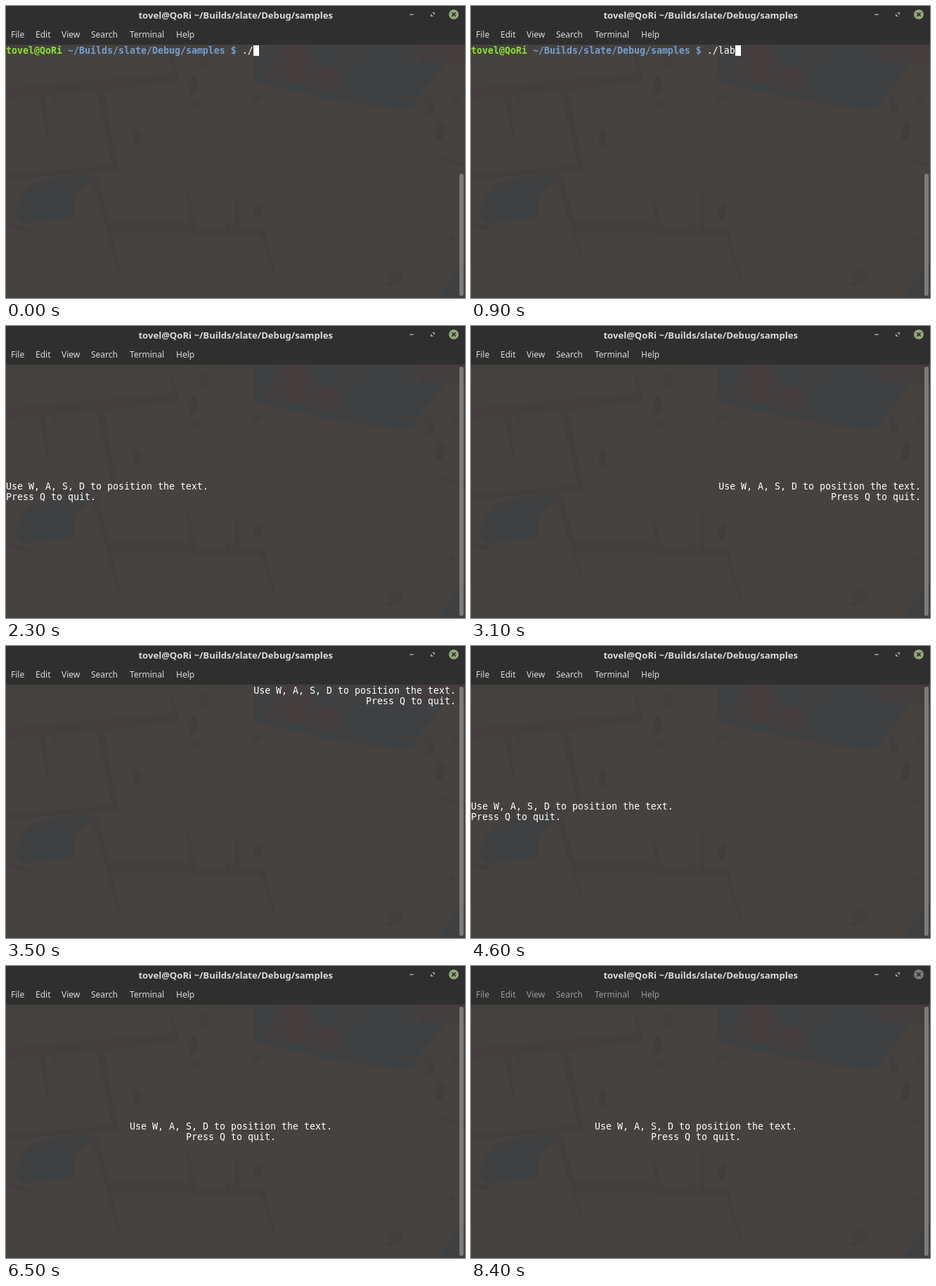
An HTML page for the animation above (8600 ms loop, 653 by 416 pixels).

```html
<!DOCTYPE html>
<html lang="en">
<head>
<meta charset="utf-8">
<title>Terminal</title>
<style>
  html, body { margin: 0; width: 100%; height: 100%; overflow: hidden; background: #2f2f2f; }
  #stage { position: relative; width: 653px; height: 416px; overflow: hidden; }
  #stage > *, #menu span { position: absolute; white-space: pre; }

  #title { right: 188px; top: 4px; font: bold 13.1px/18px "Noto Sans", sans-serif; color: #dadada; }
  #menu { left: 0; top: 32px; font: 12px/17px "Noto Sans", sans-serif; color: #dadada; }
  #close { fill: #92a878; }
  .unfocused #menu { color: #9a9a9a; }
  .unfocused #close { fill: #7b7b7b; }

  svg { left: 0; top: 0; }
  .gap { fill: #443e3e; }
  .hole { fill: #3f4042; }

  .term { left: 0; width: 640px; font: 13.29px/15px "DejaVu Sans Mono", monospace; color: #fff; }
  #shell { top: 56px; }
  #shell b:first-child { color: #8ae234; }
  #shell b { color: #729fcf; }
  #cursor { width: 8px; height: 15px; background: #fff; }
  #bar { left: 645px; width: 6px; bottom: 3px; border-radius: 3px; background: #7d7b79; }
</style>
</head>
<body>
<div id="stage">
  <svg width="653" height="416">
    <rect y="55" width="653" height="361" fill="#46423f"/>
    <g class="gap">
      <path d="M0 117L237 96 231 66 238 70 245 107 139 120 160 234 0 247V239L152 227 128 122 70 126V145L63 127 57 128 61 195 47 129 0 130Z"/>
      <path d="M122 246L130 242 147 308H258L268 317H366L390 411 362 327H268L256 320H149L165 392Z"/>
      <path d="M258 262L272 318H262ZM329 262L334 318H324ZM316 304L320 318H312Z"/>
      <path d="M0 311L20 311 41 322 0 316ZM604 210L653 226V231Z"/>
      <ellipse cx="553" cy="385" rx="11" ry="8"/>
      <ellipse cx="546" cy="396" rx="6" ry="3"/>
      <ellipse cx="281" cy="77" rx="6" ry="11"/>
      <ellipse cx="357" cy="131" rx="7" ry="5"/>
      <ellipse cx="640" cy="132" rx="5" ry="5"/>
      <ellipse cx="635" cy="331" rx="4" ry="4"/>
    </g>
    <g class="hole">
      <path d="M352 55H577L584 78 625 82 606 108 588 126 580 143Q572 148 558 147L470 135 353 108Z"/>
      <path d="M12 300L16 282 31 256 60 246 124 239 120 251 96 271V300L24 311Z"/>
      <path d="M653 366V416H613Z"/>
    </g>
    <path class="gap" d="M390 55H428L431 69 441 82 462 88 481 98 474 124 370 102ZM577 55H653V84L590 79ZM487 66L496 68 494 80 487 78Z"/>
    <g fill="#413e3f">
      <ellipse cx="266" cy="113" rx="6" ry="13"/>
      <ellipse cx="271" cy="140" rx="4" ry="4"/>
      <ellipse cx="187" cy="188" rx="5" ry="12"/>
      <ellipse cx="358" cy="293" rx="5" ry="11" transform="rotate(18 358 293)"/>
      <ellipse cx="601" cy="141" rx="6" ry="14" transform="rotate(-12 601 141)"/>
      <ellipse cx="618" cy="179" rx="6" ry="14" transform="rotate(12 618 179)"/>
    </g>
    <path d="M574 11.5h6v1.5h-6zM606 9h4v4zM604 11v4h4z" fill="#a2a2a2"/>
    <circle id="close" cx="637" cy="12" r="7"/>
    <path d="M634.3 9.3l5.4 5.4m0-5.4l-5.4 5.4" stroke="#2f2f2f" stroke-width="1.7"/>
  </svg>

  <div id="title">tovel@QoRi ~/Builds/slate/Debug/samples</div>
  <div id="menu"><span style="left:7px">File</span><span style="left:42px">Edit</span><span style="left:79px">View</span><span style="left:121px">Search</span><span style="left:176px">Terminal</span><span style="left:242px">Help</span></div>

  <div id="shell" class="term"><b>tovel@QoRi</b> <b>~/Builds/slate/Debug/samples $</b> ./<span id="typed"></span></div>
  <div id="cursor"></div>
  <div id="label" class="term">Use W, A, S, D to position the text.
Press Q to quit.</div>
  <div id="bar"></div>
</div>

<script>
const LOOP = 8600, APP_START = 1500, ENTER = 1400, BLUR = 8400;
const CELL = 8, ROW = 15, TOP = 56, PROMPT_COLS = 44;
const KEY_TIMES = [600, 700, 900, 1000, 1200];
const ROW_TOPS = { top: 56, middle: 221, bottom: 386 };
const MOVES = [
  [1500, "middle", "center"],
  [2300, "middle", "left"],
  [2700, "middle", "center"],
  [3100, "middle", "right"],
  [3500, "top", "right"],
  [3900, "top", "center"],
  [4200, "top", "left"],
  [4600, "middle", "left"],
  [4900, "bottom", "left"],
  [5300, "bottom", "center"],
  [5700, "bottom", "right"],
  [6200, "middle", "right"],
  [6500, "middle", "center"]
];

const $ = id => document.getElementById(id);
const stage = $("stage"), shell = $("shell"), typed = $("typed");
const cursor = $("cursor"), label = $("label"), bar = $("bar");
const show = (el, on) => { el.style.visibility = on ? "visible" : "hidden"; };

function render(t) {
  const running = t >= APP_START;
  show(shell, !running);
  show(label, running);
  bar.style.top = (running ? 58 : 239) + "px";
  stage.classList.toggle("unfocused", t >= BLUR);

  if (running) {
    const [, row, align] = MOVES.filter(m => m[0] <= t).pop();
    label.style.top = ROW_TOPS[row] + "px";
    label.style.textAlign = align;
  }

  const count = KEY_TIMES.filter(k => k <= t).length;
  const entered = t >= ENTER;
  typed.textContent = "label".slice(0, count);
  cursor.style.left = (entered ? 0 : (PROMPT_COLS + count) * CELL) + "px";
  cursor.style.top = (entered ? TOP + ROW : TOP) + "px";
  show(cursor, !running && (t < 200 || t >= KEY_TIMES[0]));
}

function tick() {
  render(performance.now() % LOOP);
  requestAnimationFrame(tick);
}
tick();
</script>
</body>
</html>
```
